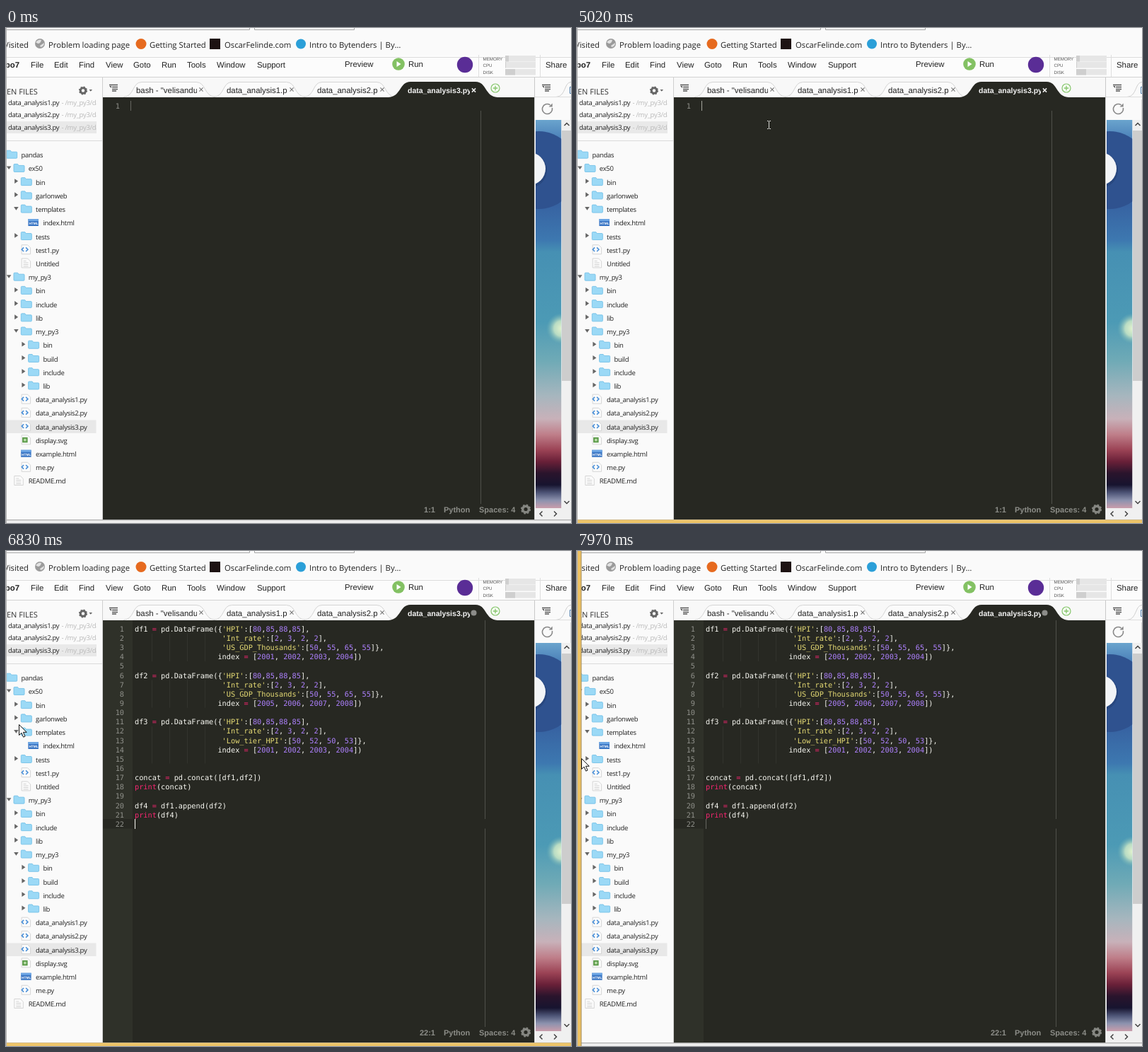
Animation of 799x700 px, one loop 8000 ms. Source, as an HTML page:

```html
<!DOCTYPE html>
<html lang="en">
<head>
<meta charset="utf-8">
<title>Code editor</title>
<style>
html, body { margin: 0; width: 100%; height: 100%; overflow: hidden; background: #fafafa; }
#stage { display: block; width: 799px; height: 700px; }
text { white-space: pre; text-rendering: geometricPrecision; }
.mark { font: 11.3px "Open Sans", "Noto Sans", sans-serif; fill: #222; }
.menu { font: 11.4px "Liberation Sans", Arial, sans-serif; fill: #222; }
.bold { font-weight: bold; }
.active { font: bold 10.5px "Liberation Sans", Arial, sans-serif; fill: #f4f4f4; }
.head { font: 11px "Open Sans", "Noto Sans", sans-serif; fill: #333; }
.tree { font: 9.5px "Open Sans", "Noto Sans", sans-serif; letter-spacing: -.3px; fill: #222; }
.pale { fill: #b9b9b9; }
.tiny { font: 6.2px "Liberation Sans", Arial, sans-serif; fill: #555; }
.stat { font: bold 11px "Liberation Sans", Arial, sans-serif; fill: #8c8d88; }
.mono { font: 10.28px "DejaVu Sans Mono", monospace; fill: #f8f8f2; }
.num { fill: #8f908a; }
.end { text-anchor: end; }
.str { fill: #e6db74; }
.val { fill: #ae81ff; }
.key { fill: #f92672; }

.anim { animation: 8s step-end infinite; }
.blank { animation-name: blank; }
.filled { animation-name: filled; }
.caret { animation-name: caret; }
.side { animation-name: side; }
.base { animation-name: base; }
.beam { animation-name: beam; }
.arrow { animation-name: arrow; }
@keyframes blank { 0% { opacity: 1 } 80%, 100% { opacity: 0 } }
@keyframes filled { 0% { opacity: 0 } 80%, 100% { opacity: 1 } }
@keyframes caret {
  0% { opacity: .3 } 62.75% { opacity: .6 } 64.75% { opacity: 1 }
  71.625% { opacity: .6 } 73.5% { opacity: .3 } 76.875% { opacity: .6 }
  78.5% { opacity: 1 } 87.375% { opacity: .6 } 89.125%, 100% { opacity: .3 }
}
@keyframes side {
  0% { opacity: 0 } 6.25% { opacity: 1 } 61.125% { opacity: 0 } 94.25%, 100% { opacity: 1 }
}
@keyframes base { 0% { opacity: 0 } 61.125% { opacity: 1 } 94.25%, 100% { opacity: 0 } }
@keyframes beam {
  0% { opacity: 0; transform: translate(224px, 136px) }
  57.375% { opacity: 1; transform: translate(224px, 136px) }
  59.25% { opacity: 1; transform: translate(278px, 132px) }
  61.125% { opacity: 1; transform: translate(271px, 137px) }
  80%, 100% { opacity: 0; transform: translate(271px, 137px) }
}
@keyframes arrow {
  0% { opacity: 0; transform: translate(18px, 245px) }
  85.375% { opacity: 1; transform: translate(18px, 245px) }
  87.375% { opacity: 0; transform: translate(18px, 245px) }
  97.75% { opacity: 1; transform: translate(14px, 297px) }
  99.625%, 100% { opacity: 1; transform: translate(6px, 293px) }
}
</style>
</head>
<body>
<svg id="stage" viewBox="0 0 799 700" xmlns="http://www.w3.org/2000/svg"></svg>
<script>
const out = [];
const add = s => out.push(s);
const esc = s => s.replace(/&/g, "&amp;").replace(/</g, "&lt;");
const rect = (x, y, w, h, fill) =>
  add(`<rect x="${x}" y="${y}" width="${w}" height="${h}" fill="${fill}"/>`);
const disc = (x, y, r, fill, more = "") =>
  add(`<circle cx="${x}" cy="${y}" r="${r}" fill="${fill}" ${more}/>`);
const path = (d, fill, stroke = "none", w = 1) =>
  add(`<path d="${d}" fill="${fill}" stroke="${stroke}" stroke-width="${w}"/>`);
const text = (x, y, s, cls) => add(`<text x="${x}" y="${y}" class="${cls}">${esc(s)}</text>`);
const clipped = (x, y, w, s, cls) =>
  add(`<svg x="${x}" y="${y - 14}" width="${w}" height="20"><text y="14" class="${cls}">${esc(s)}</text></svg>`);
const group = (cls, draw) => { add(`<g class="anim ${cls}">`); draw(); add("</g>"); };

function gear(x, y, r, fill) {
  disc(x, y, r * .62, "none", `stroke="${fill}" stroke-width="${r * .5}"`);
  disc(x, y, r * .88, "none", `stroke="${fill}" stroke-width="${r * .26}" stroke-dasharray="${r * .346}"`);
}

function panelIcon(x, y) {
  path(`M${x - 6} ${y - 3.5}h12M${x - 2} ${y - .5}h8M${x - 2} ${y + 2.5}h8M${x - 2} ${y + 5}h6`, "none", "#555", 1.3);
  path(`M${x - 6} ${y - 2}h3v3z`, "#555");
}

function cross(x, y, color, w = 1.1) {
  path(`M${x - 2.6} ${y - 2.6}l5.2 5.2m0 -5.2l-5.2 5.2`, "none", color, w);
}

function topBars() {
  rect(0, 0, 799, 39, "#fafafa");
  path("M0 2.5H344.5V0M351.5 0V2.5H492.5V0", "none", "#a5a5a5");
  rect(0, 39, 799, 31, "#fcfcfc");
  path("M0 41.5H799", "none", "#dcdcdc");
  path("M0 69.5H799", "none", "#d2d2d2");

  text(32, 28, "Visited", "mark end");
  disc(48, 22, 7, "#9b9b9b");
  path("M42 20q4 -5 8 -3q-1 5 -5 5zM48 25l6 -4q0 5 -5 6z", "#e2e2e2");
  text(60, 28, "Problem loading page", "mark");
  disc(191, 22.5, 7.5, "#e66a1f");
  text(203, 28, "Getting Started", "mark");
  rect(288, 15, 15, 15, "#1d1212");
  text(309, 28, "OscarFelinde.com", "mark");
  disc(417, 22.5, 7, "#2b9fd8");
  text(429, 28, "Intro to Bytenders | By…", "mark");

  text(19, 56, "bo7", "menu bold end");
  [[35, "File"], [68, "Edit"], [103, "Find"], [141, "View"], [180, "Goto"], [220, "Run"],
   [256, "Tools"], [298, "Window"], [355, "Support"]].forEach(([x, s]) => text(x, 56, s, "menu"));
  text(479, 55, "Preview", "menu");
  disc(555, 51, 8.8, "#83c163");
  path("M552.5 47l6 4l-6 4z", "#fff");
  text(569, 55, "Run", "menu");
  disc(649, 52, 11.2, "#5a2d96");
  path("M668.5 38V69M755.5 38V69", "none", "#dedede");
  [["MEMORY", 43, 5], ["CPU", 52, 1], ["DISK", 62, 14]].forEach(([s, y, w]) => {
    text(674.5, y + 2.6, s, "tiny");
    rect(706, y - 4, 43, 8.5, "#e6e6e6");
    rect(706, y - 4, w, 8.5, "#cfcfcf");
  });
  text(763, 56, "Share", "menu");
}

function folder(x, y) {
  path(`M${x - 6.8} ${y + 4.5}v-9q0 -1 1 -1h4.5l1.5 2h7q1 0 1 1v7q0 1 -1 1h-13q-1 0 -1 -1z`, "#9bd9f6", "#74c1e8", .9);
}

function page(x, y) {
  path(`M${x - 6} ${y - 6.5}h8.5l4 4v9h-12.5z`, "#fbfbfb", "#d2d2d2", .9);
}

const icons = {
  dir: folder,
  py(x, y) {
    page(x, y);
    path(`M${x - 3} ${y - 2.8}l-2.8 2.8l2.8 2.8M${x} ${y - 2.8}l2.8 2.8l-2.8 2.8`, "none", "#4a90d9", 1.6);
  },
  doc(x, y) {
    page(x, y);
    path(`M${x - 3.5} ${y - 3}h4m-4 2.5h7m-7 2.5h7m-7 2.5h7`, "none", "#c8c8c8", .8);
  },
  html(x, y) {
    rect(x - 7, y - 4.8, 14.5, 10, "#3774c4");
    rect(x - 7, y - 4.8, 14.5, 3, "#6da6e4");
    add(`<text x="${x - 6}" y="${y + 3.4}" font-size="4.8" font-weight="bold" font-family="Liberation Sans, sans-serif" fill="#fff">HTML</text>`);
  },
  svg(x, y) {
    page(x, y);
    rect(x - 5, y - 3.5, 7.5, 7.5, "#5a9a48");
    rect(x - 3, y - 1.5, 3.5, 3.5, "#b9dca8");
  }
};

// level, icon, name, twisty: "+" closed, "-" open
const tree = `0 dir pandas
1 dir ex50 -
2 dir bin +
2 dir garlonweb +
2 dir templates -
3 html index.html
2 dir tests +
2 py test1.py
2 doc Untitled
1 dir my_py3 -
2 dir bin +
2 dir include +
2 dir lib +
2 dir my_py3 -
3 dir bin +
3 dir build +
3 dir include +
3 dir lib +
2 py data_analysis1.py
2 py data_analysis2.py
2 py data_analysis3.py
2 svg display.svg
2 html example.html
2 py me.py
1 doc README.md`.split("\n").map(s => s.split(" "));

function sidebar() {
  rect(0, 70, 136, 626, "#fafafa");
  text(1, 93.5, "EN FILES", "head");
  gear(109, 88.5, 6, "#666");
  path("M117.5 87h4.5l-2.2 2.8z", "#666");
  rect(0, 132, 128, 17, "#e9e9e9");
  [1, 2, 3].forEach(n => {
    const y = 91.5 + n * 17.4;
    text(3, y, `data_analysis${n}.py`, "tree");
    clipped(78.5, y, 49.5, "- /my_py3/data", "tree pale");
  });
  path("M0 159.5H136", "none", "#dadada");
  rect(0, 554.5, 127.5, 18.5, "#e8e8e8");
  tree.forEach(([level, kind, name, twisty], i) => {
    const y = 179.2 + i * 19.22, x = 7.5 + level * 10.3;
    icons[kind](x, y - .5);
    if (twisty === "+") path(`M${x - 16} ${y - 4.5}l5 3.4l-5 3.4z`, "#666");
    if (twisty === "-") path(`M${x - 17} ${y - 3}h6.6l-3.3 4.6z`, "#666");
    text(x + (level ? 14 : 11.5), y + 4, name, "tree");
  });
  path("M136.5 70V696", "none", "#cfcfcf");
}

function tabs() {
  rect(137, 70, 662, 28, "#f8f8f8");
  panelIcon(152, 84);
  [["bash - \"velisandu", 184, 86], ["data_analysis1.py", 312, 85], ["data_analysis2.py", 440, 85]].forEach(([s, x, w], i) => {
    const l = 166 + i * 127.5;
    path(`M${l} 97.5C${l + 16} 97 ${l + 12} 76.5 ${l + 26} 76.5H${l + 103}C${l + 117} 76.5 ${l + 114} 97 ${l + 130} 97.5`, "#fbfbfb", "#d4d4d4");
    clipped(x, 91.5, w, s, "menu");
    cross(x + 92, 87, "#777");
  });
  path("M541 98C559 97 556 76 572 76H664C680 76 677 97 695 98z", "#272822");
  clipped(568, 91.5, 88, "data_analysis3.py", "active");
  disc(692, 85, 6, "#f6fbf3", 'stroke="#85c56c" stroke-width="1.2"');
  path("M688.8 85h6.4M692 81.8v6.4", "none", "#85c56c", 1.3);
}

const table = (name, label, tier, years) => {
  const pad = " ".repeat(20);
  return [`${name} = pd.DataFrame({'HPI':[80,85,88,85],`, `${pad}'Int_rate':[2, 3, 2, 2],`,
    `${pad}'${label}':[${tier}]},`, `${pad.slice(1)}index = [${years}])`];
};
const early = "2001, 2002, 2003, 2004", gdp = "50, 55, 65, 55";
const lines = [
  ...table("df1", "US_GDP_Thousands", gdp, early), "",
  ...table("df2", "US_GDP_Thousands", gdp, "2005, 2006, 2007, 2008"), "",
  ...table("df3", "Low_tier_HPI", "50, 52, 50, 53", early), "", "",
  "concat = pd.concat([df1,df2])", "print(concat)", "",
  "df4 = df1.append(df2)", "print(df4)", ""
];
const paint = s => s.replace(/('[^']*')|\b(\d+)\b|(=|\bprint\b)/g, (m, str, val) =>
  `<tspan class="${str ? "str" : val ? "val" : "key"}">${m}</tspan>`);

function editor() {
  const pitch = 13.14, top = 103.5;
  rect(137, 98, 610, 597.5, "#272822");
  group("blank", () => {
    text(161, 114, "1", "mono num end");
    path("M671.5 117V673", "none", "#50514b");
    add('<rect class="anim caret" x="176" y="103" width="1" height="14" fill="#f8f8f0"/>');
    cross(661.5, 88, "#eee", 1.5);
    text(607, 685, "1:1", "stat end");
  });
  group("filled", () => {
    rect(137, 98, 42, 597.5, "#2f3129");
    rect(137, 379, 42, 13.5, "#272822");
    path("M677.5 98V379M677.5 392.5V673", "none", "#50514b");
    [[1, 3], [6, 3], [11, 4]].forEach(([row, n]) => {
      for (let k = 1; k < 5; k++) {
        const x = Math.round(181.5 + k * 24.76) + .5;
        path(`M${x} ${top + row * pitch}v${n * pitch}`, "none", "#32332d");
      }
    });
    lines.forEach((s, i) => {
      const y = top + i * pitch + 10.4;
      text(167, y, String(i + 1), "mono num end");
      add(`<text x="182" y="${y}" class="mono">${paint(s)}</text>`);
    });
    add('<rect class="anim caret" x="182" y="379" width="1" height="14" fill="#f8f8f0"/>');
    disc(661.5, 87.5, 4, "#8c8c89");
    text(607, 685, "22:1", "stat end");
  });
  text(619, 685, "Python", "stat");
  text(669, 685, "Spaces: 4", "stat");
  gear(735, 680.5, 7, "#858681");
}

function preview() {
  rect(747, 70, 52, 626, "#fafafa");
  path("M747.5 70V696", "none", "#c8c8c8");
  panelIcon(764, 84);
  path("M778 97.5C792 97 789 76.5 799 76.5", "none", "#d0d0d0");
  path("M799 83.5h-1.5v9h1.5", "none", "#4f7fae");
  path("M748 97.5H799", "none", "#dedede");
  path("M769.5 108.8A7 7 0 1 0 772.3 113", "none", "#888", 1.6);
  path("M767.5 111.5h5.2v-5z", "#888");
  path("M798.5 101V130", "none", "#ddd");

  const stops = [[0, "#6aa4cd"], [5, "#4a7fb8"], [22, "#3763a2"], [31, "#3d78b0"], [34, "#4690b3"],
    [52, "#4c9ab5"], [62, "#6faab6"], [71, "#a6b6be"], [77, "#c8b1b9"], [81, "#bf7f8a"],
    [85, "#9b4355"], [88, "#692038"], [91, "#2a142c"], [94, "#17142f"], [96, "#4d5476"], [98, "#8c92ae"], [100, "#c99dab"]];
  add('<defs><linearGradient id="sky" x2="0" y2="1">' +
    stops.map(([p, c]) => `<stop offset="${p}%" stop-color="${c}"/>`).join("") +
    '</linearGradient><radialGradient id="glow"><stop offset="0" stop-color="#e4f3cd"/>' +
    '<stop offset=".5" stop-color="#b9dcc4"/><stop offset="1" stop-color="#6fb0b5" stop-opacity="0"/></radialGradient></defs>');
  add('<svg x="749" y="130" width="36.5" height="549">');
  rect(0, 0, 37, 549, "url(#sky)");
  disc(4, 71, 55, "#2f528f");
  disc(-9, 71, 25, "#28477f");
  disc(-9, 69, 23, "#f2f4f7");
  disc(37, 295, 22, "url(#glow)");
  add("</svg>");

  rect(785.5, 130, 13.5, 549, "#f0f0f0");
  rect(786, 145, 13, 354, "#cdcdcd");
  rect(749, 679, 50, 17, "#f0f0f0");
  path("M789.5 138l3.5 -3.5l3.5 3.5M789.5 669l3.5 3.5l3.5 -3.5M758.5 683.5l-3.5 3.5l3.5 3.5M775 683.5l3.5 3.5l-3.5 3.5", "none", "#444", 1.5);
}

function overlays() {
  rect(0, 695.5, 799, 4.5, "#f0f0f0");
  path("M0 695.8H799", "none", "#999");
  rect(0, 0, 1, 700, "#b5b5b5");
  group("base", () => rect(1, 695.5, 798, 4.5, "#edc468"));
  group("side", () => {
    rect(1, 0, 5, 700, "#edc162");
    rect(5.5, 0, 1, 700, "#a08a5c");
  });
  group("beam", () => path("M-2 -5.5h2m1 0h2M.5 -5V5M-2 5.5h2m1 0h2", "none", "#d8d8d5"));
  group("arrow", () => path("M.5 .5V15.5L4 12.2L6.6 18.2L9 17.1L6.4 11.3H11.2z", "#fff", "#111"));
}

[topBars, sidebar, tabs, editor, preview, overlays].forEach(draw => draw());
document.getElementById("stage").innerHTML = out.join("");
</script>
</body>
</html>
```
